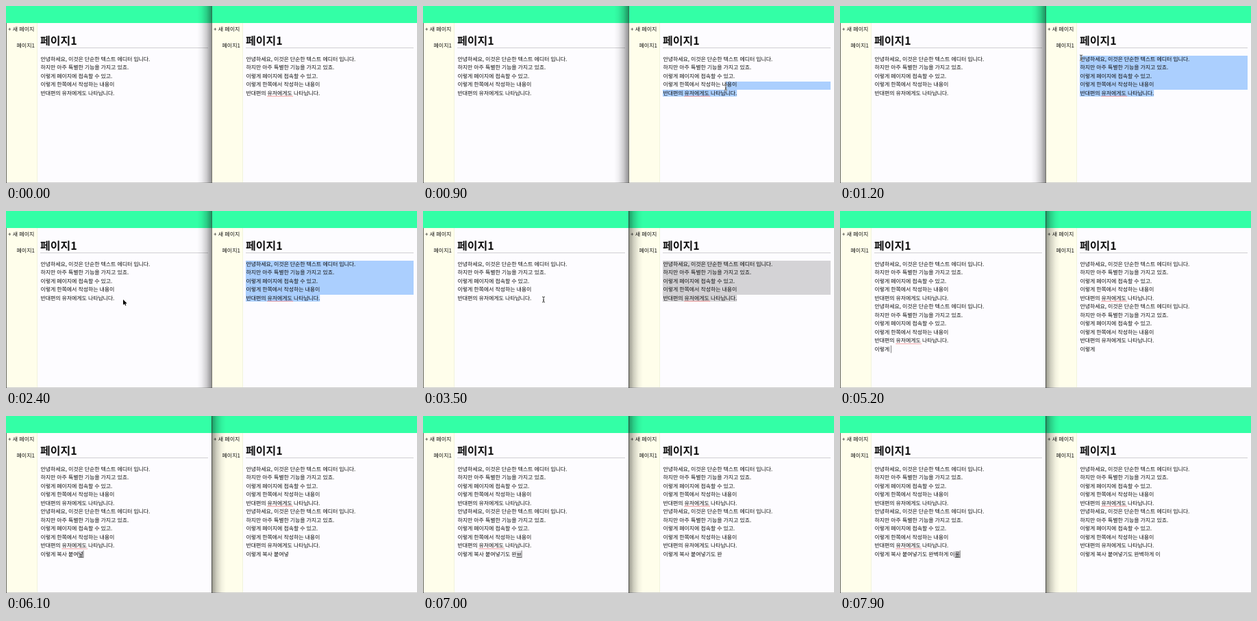
Animation of 600 by 260 pixels, one loop 8 s. Source, as an HTML page with a canvas:

```html
<!DOCTYPE html>
<html lang="ko">
<head>
<meta charset="utf-8">
<title>공유 텍스트 에디터</title>
<style>
  html, body { margin: 0; width: 100%; height: 100%; overflow: hidden; }
  canvas { display: block; width: 600px; height: 260px; }
</style>
</head>
<body>
<canvas id="stage"></canvas>
<script>
const LOOP = 8000;
const FAMILY = '"Noto Sans CJK KR", "Noto Sans CJK", sans-serif';
const LABEL = { font: `8px ${FAMILY}`, spacing: '0px' };
const BODY = { font: `8px ${FAMILY}`, spacing: '-0.12px' };
const TITLE = { font: `bold 16px ${FAMILY}`, spacing: '0px' };
const TEXT_X = 50.5, TEXT_TOP = 73, ROW = 12.5;
const PARAGRAPH = [
  '안녕하세요, 이것은 단순한 텍스트 에디터 입니다.',
  '하지만 아주 특별한 기능을 가지고 있죠.',
  '이렇게 페이지에 접속할 수 있고.',
  '이렇게 한쪽에서 작성하는 내용이',
  '반대편의 유저에게도 나타납니다.'
];
const TYPED = '이렇게 복사 붙여넣기도 완벽하게 이룽';

// Moments in ms
const DRAG = 800, LEAVE = 1900, ACTIVATE = 2600, NEWLINE = 3600, PASTE = 4100, ENTER = 4600;
const SYNC_DELAY = 75;

// [time, x, y]
const POINTER = [
  [100, 526, 131], [600, 459, 128], [DRAG, 459, 128], [1200, 352, 76],
  [1600, 352, 77], [LEAVE, 352, 77], [2400, 171, 130], [ACTIVATE, 176, 130]
];
// [time, number of keys pressed]
const KEYS = [
  [4650, 1], [4980, 7], [5180, 8], [5960, 19], [6020, 22], [6280, 24],
  [6480, 25], [7280, 35], [7380, 36], [7700, 40], [7830, 41], [7890, 43]
];

const canvas = document.getElementById('stage');
const scale = window.devicePixelRatio || 1;
canvas.width = 600 * scale;
canvas.height = 260 * scale;
const ctx = canvas.getContext('2d');
ctx.scale(scale, scale);
ctx.textRendering = 'geometricPrecision';

const linear = u => u;
const smooth = u => u * u * (3 - 2 * u);

function track(points, t, ease) {
  if (t <= points[0][0]) return points[0].slice(1);
  const next = points.findIndex(p => p[0] > t);
  if (next < 0) return points[points.length - 1].slice(1);
  const a = points[next - 1], b = points[next];
  const u = ease((t - a[0]) / (b[0] - a[0]));
  return a.slice(1).map((v, i) => v + (b[i + 1] - v) * u);
}

// Every state of the Hangul input method while the text is typed
function compose(text) {
  const leads = 'ㄱㄲㄴㄷㄸㄹㅁㅂㅃㅅㅆㅇㅈㅉㅊㅋㅌㅍㅎ';
  const tails = ' ㄱㄲㄳㄴㄵㄶㄷㄹㄺㄻㄼㄽㄾㄿㅀㅁㅂㅄㅅㅆㅇㅈㅊㅋㅌㅍㅎ';
  const states = [{ done: '', live: '' }];
  let done = '', live = '';
  for (const ch of text) {
    const before = done;
    done += live;
    if (ch === ' ') {
      done += ' ';
      live = '';
      states.push({ done, live });
      continue;
    }
    const code = ch.charCodeAt(0) - 0xAC00;
    const lead = leads[Math.floor(code / 588)], tail = code % 28;
    const tailIndex = tails.indexOf(lead);
    const isOpen = live && (live.charCodeAt(0) - 0xAC00) % 28 === 0;
    states.push(isOpen && tailIndex > 0
      ? { done: before, live: String.fromCharCode(live.charCodeAt(0) + tailIndex) }
      : { done, live: lead });
    states.push({ done, live: String.fromCharCode(0xAC00 + code - tail) });
    if (tail) states.push({ done, live: ch });
    live = ch;
  }
  return states;
}
const STATES = compose(TYPED);

function typedAt(t) {
  if (t < KEYS[0][0]) return STATES[0];
  const count = Math.floor(track(KEYS, t, linear)[0] + 1e-6);
  return STATES[Math.min(count, STATES.length - 1)];
}

function rect(x, y, w, h, color) {
  ctx.fillStyle = color;
  ctx.fillRect(x, y, w, h);
}

function useStyle({ font, spacing }) {
  ctx.font = font;
  ctx.letterSpacing = spacing;
}

function write(text, x, y, style = BODY, align = 'left') {
  useStyle(style);
  ctx.textAlign = align;
  ctx.fillStyle = '#111';
  ctx.fillText(text, x, y);
}

function rowEnd(text) {
  useStyle(BODY);
  return TEXT_X + ctx.measureText(text).width;
}

const rowTop = row => TEXT_TOP + row * ROW;
const caret = (x, row) => rect(x, rowTop(row) - .5, .7, 11, '#444');

function spelling(row) {
  const start = rowEnd('반대편의 '), end = rowEnd('반대편의 유저에게도');
  for (let x = start; x < end; x += 2) rect(x, rowTop(row) + 9, 1.2, 1, '#f46a6a');
}

function drawWindow() {
  rect(0, 0, 300, 260, '#fdfcff');
  rect(0, 25, 45, 235, '#fffeeb');
  rect(45, 25, 1, 235, '#f1f3dc');
  rect(0, 0, 300, 25, '#33ffa6');
  rect(50, 61, 245, 1, '#cfced1');
  rect(0, 259, 300, 1, '#cfcfcf');
  write('+ 새 페이지', 3, 36.5, LABEL);
  write('페이지1', 42, 61, LABEL, 'right');
  write('페이지1', 50, 57, TITLE);
}

function drawSelection(t) {
  if (t < DRAG || t >= NEWLINE) return;
  const [px, py] = track(POINTER, Math.min(t, LEAVE), smooth);
  const last = PARAGRAPH.length - 1;
  const first = Math.max(0, Math.min(last, Math.floor((py - TEXT_TOP) / ROW)));
  const top = row => Math.round(rowTop(row));
  const color = t < ACTIVATE ? '#abcffe' : '#d4d3d6';
  for (let row = first; row <= last; row++) {
    const start = row === first && t < 1200 ? Math.max(50, px - 300) : 50;
    const end = row === last ? rowEnd(PARAGRAPH[last]) : 295;
    const height = row === last ? 10 : top(row + 1) - top(row);
    if (end > start) rect(start, top(row), end - start, height, color);
  }
}

function drawText(t, state) {
  const lines = t < PASTE ? PARAGRAPH : [...PARAGRAPH, ...PARAGRAPH];
  lines.forEach((line, row) => write(line, TEXT_X, rowTop(row) + 7.7));
  write(state.done + state.live, TEXT_X, rowTop(10) + 7.7);
}

function drawLeft(t) {
  const state = typedAt(t);
  const start = rowEnd(state.done), end = rowEnd(state.done + state.live);
  drawWindow();
  if (state.live) rect(start, rowTop(10), end - start, 10, '#e2e1e5');
  drawText(t, state);
  if (state.live) rect(start, rowTop(10) + 9, end - start, 1, '#444');
  if (t >= ENTER) {
    spelling(9);
    caret(end, 10);
  } else if (t >= PASTE) {
    caret(rowEnd(PARAGRAPH[4]), 9);
  } else if (t >= NEWLINE && t < 3900) {
    caret(TEXT_X, 5);
  } else if (t >= 2700 && t < 3200) {
    caret(rowEnd(PARAGRAPH[4]), 4);
  }
}

function drawRight(t) {
  ctx.save();
  ctx.translate(300, 0);
  drawWindow();
  drawSelection(t);
  drawText(t, typedAt(t - SYNC_DELAY));
  if (t < NEWLINE || t >= 3900) spelling(4);
  ctx.restore();
}

// The active window casts its shadow on the other one
function drawEdges(t) {
  const side = t < ACTIVATE ? -1 : 1;
  const shade = ctx.createLinearGradient(300, 0, 300 + side * 21, 0);
  shade.addColorStop(0, 'rgba(0,0,0,.42)');
  shade.addColorStop(.35, 'rgba(0,0,0,.19)');
  shade.addColorStop(.7, 'rgba(0,0,0,.05)');
  shade.addColorStop(1, 'rgba(0,0,0,0)');
  rect(side < 0 ? 279 : 300, 0, 21, 260, shade);
  rect(300, 0, 1, 260, 'rgba(40,40,40,.65)');
  rect(0, 25, 1, 235, 'rgba(40,40,40,.7)');
}

function drawPointer(t) {
  if (t < 100 || t >= NEWLINE) return;
  const [x, y] = track(POINTER, t, smooth);
  ctx.save();
  ctx.translate(x, y);
  const isArrow = t >= LEAVE && t < 2500;
  const shape = new Path2D(isArrow
    ? 'M0 0V8L1.9 6.3 3.2 9 4.4 8.5 3.2 6 5.6 5.8Z'
    : 'M-2-4Q0-4 0-3Q0-4 2-4M0-3V3M-2 4Q0 4 0 3Q0 4 2 4M-1 1H1');
  ctx.strokeStyle = '#fff';
  ctx.lineWidth = isArrow ? 1.4 : 2;
  ctx.stroke(shape);
  if (isArrow) {
    ctx.fillStyle = '#000';
    ctx.fill(shape);
  } else {
    ctx.strokeStyle = '#222';
    ctx.lineWidth = .9;
    ctx.stroke(shape);
  }
  ctx.restore();
}

const startTime = performance.now();
function frame() {
  const t = (performance.now() - startTime) % LOOP;
  drawLeft(t);
  drawRight(t);
  drawEdges(t);
  drawPointer(t);
  requestAnimationFrame(frame);
}
frame();
</script>
</body>
</html>
```
